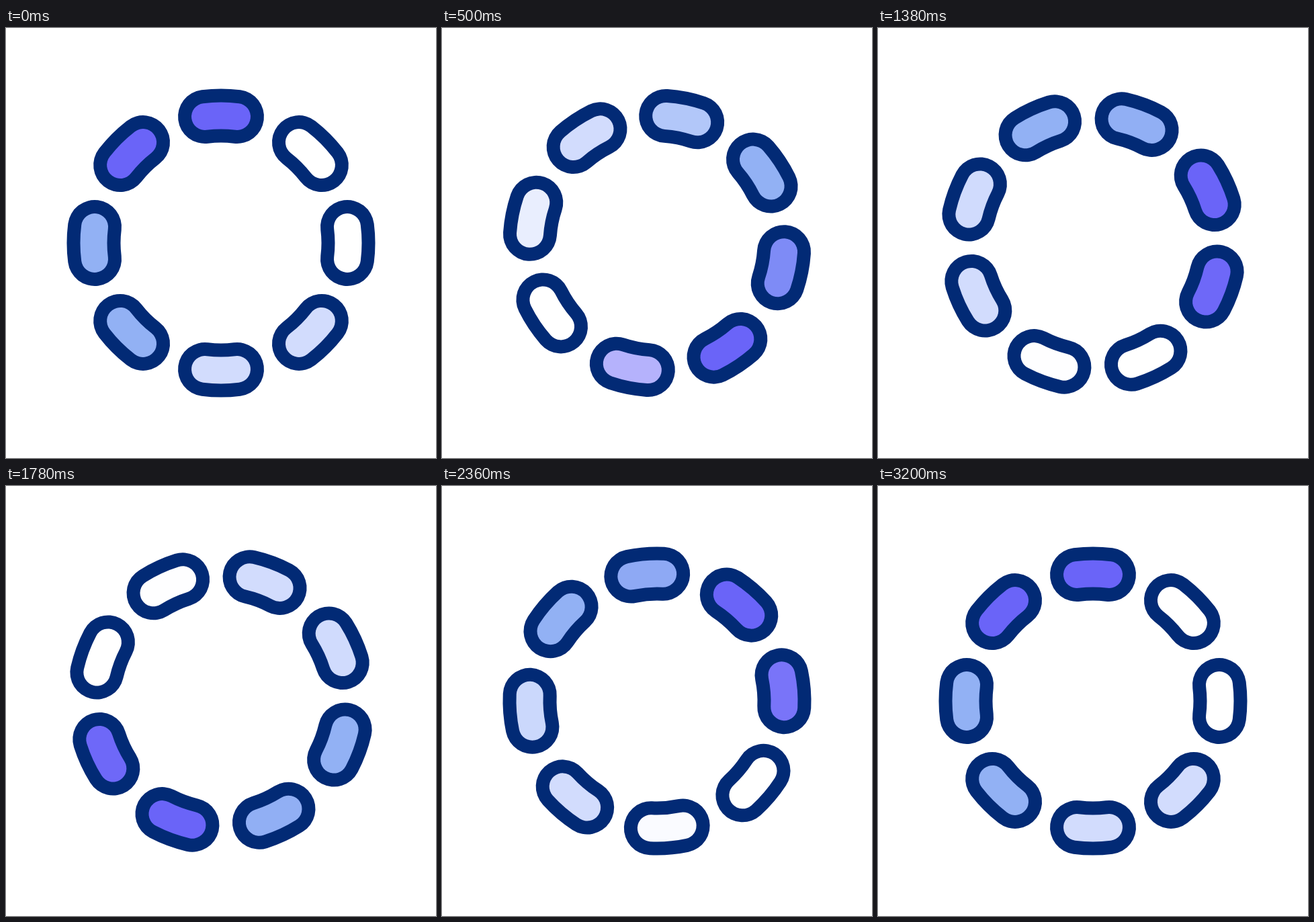
These frames come from a looping animation (640x640 px, 3220 ms). An HTML page with a canvas:

```html
<!DOCTYPE html>
<html lang="en">
<head>
<meta charset="utf-8">
<title>Loading ring</title>
<style>
  html, body { margin: 0; width: 100%; height: 100%; overflow: hidden; background: #fff; }
  canvas { display: block; width: 640px; height: 640px; }
</style>
</head>
<body>
<canvas id="stage" width="640" height="640"></canvas>
<script>
const ctx = document.getElementById('stage').getContext('2d');

const LOOP = 3220, TURN = 3200, FRAME = 20;
const COUNT = 8, STEP = Math.PI * 2 / COUNT;
const CENTER = 320, RADIUS = 189.5;
const HALF_ARC = Math.atan2(24, 188);
const NAVY = 'rgb(2,42,117)';

// Fill cycle: each colour holds for one unit, then eases to the next.
const FILLS = [[255, 255, 255], [210, 220, 253], [146, 177, 244], [106, 100, 248]];

const mod = (n, m) => ((n % m) + m) % m;
const ease = x => x * x * (3 - 2 * x);

function fillAt(u) {
  const pos = mod(u + 0.5, COUNT) / 2;
  const i = Math.floor(pos);
  const k = ease(Math.max(0, (pos - i) * 2 - 1));
  const from = FILLS[i], to = FILLS[(i + 1) % FILLS.length];
  return `rgb(${from.map((c, n) => Math.round(c + (to[n] - c) * k)).join(',')})`;
}

function bar(angle, width, color) {
  ctx.beginPath();
  ctx.arc(CENTER, CENTER, RADIUS, angle - HALF_ARC, angle + HALF_ARC);
  ctx.lineWidth = width;
  ctx.strokeStyle = color;
  ctx.stroke();
}

function draw(t) {
  ctx.fillStyle = '#fff';
  ctx.fillRect(0, 0, 640, 640);
  ctx.lineCap = 'round';
  const spin = t / TURN * Math.PI * 2;
  const shift = t / 200 + 1.5;
  for (let i = 0; i < COUNT; i++) {
    const angle = spin + i * STEP - Math.PI / 2;
    bar(angle, 80, NAVY);
    bar(angle, 40, fillAt(i - shift));
  }
}

function tick() {
  const t = performance.now() % LOOP;
  draw(Math.floor(t / FRAME) * FRAME);
  requestAnimationFrame(tick);
}
tick();
</script>
</body>
</html>
```
